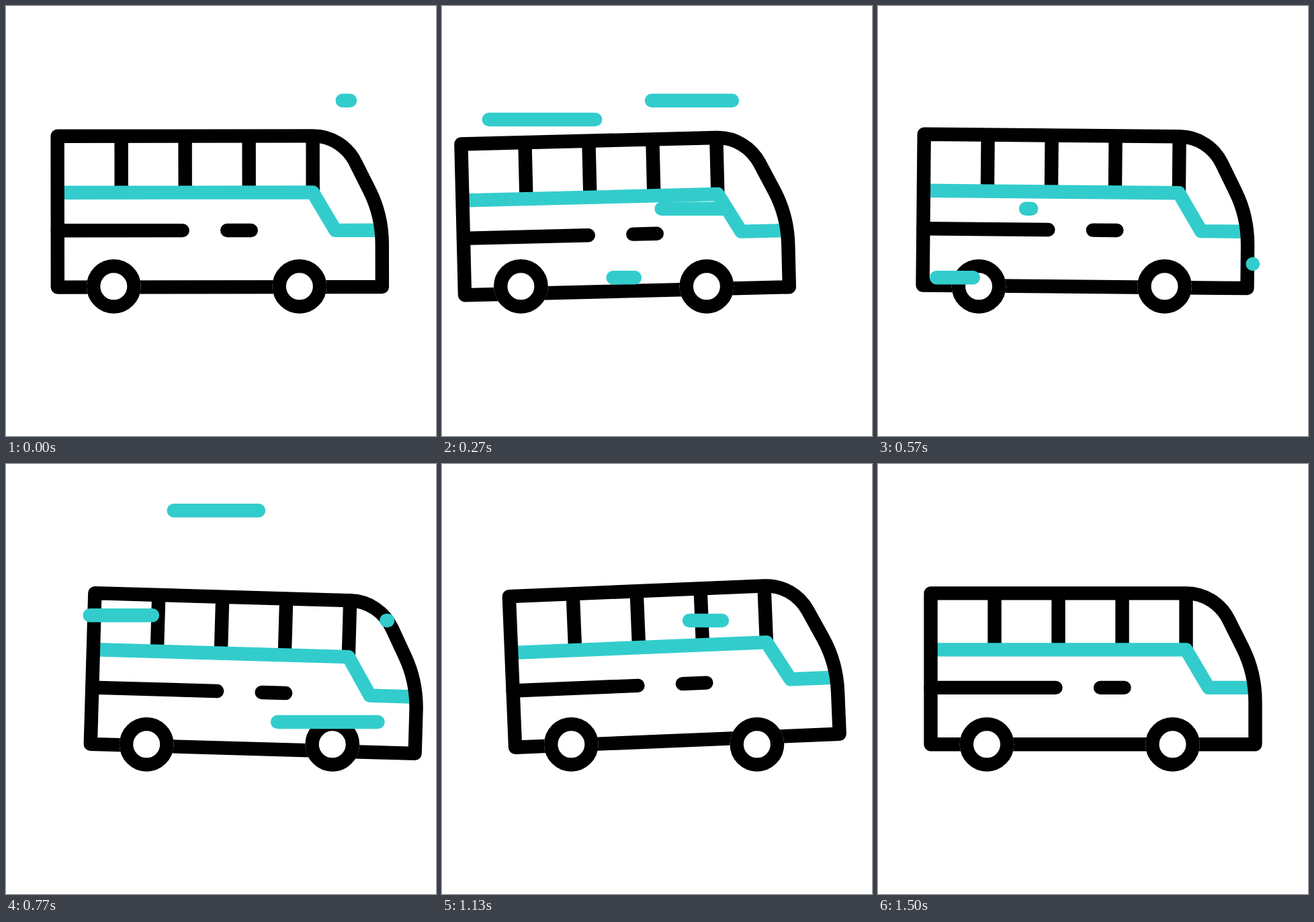
Write an HTML page that moves like this. It is 640 px wide and 640 px high and loops after 1670 ms.

```html
<!DOCTYPE html>
<html lang="en">
<head>
<meta charset="utf-8">
<title>Bus</title>
<style>
  html, body { margin: 0; height: 100%; overflow: hidden; background: #fff; }
  svg { display: block; width: 100%; height: 100%; fill: none; stroke: #000; stroke-width: 20.4; stroke-linejoin: round; }
  .teal { stroke: #3cc; }
  .round { stroke-linecap: round; }
</style>
</head>
<body>
<svg viewBox="0 0 640 640">
  <defs>
    <g id="wheel" fill="#fff">
      <circle r="40.4" stroke="none"/>
      <circle r="30.2"/>
    </g>
  </defs>
  <g id="body">
    <path d="M173.5 193v83m95-83v83m95-83v83m95-83v83"/>
    <path class="teal" d="M82 276.4H458.5L492 332.9H556"/>
    <path class="round" d="M78.5 332.9H264.5M331 332.9H366.5"/>
    <path d="M78.5 192.4H459C486 192.4 510 208 522 232L543 274C555 298 561.5 326 561.5 354V417.2H78.5Z"/>
  </g>
  <g id="wheels">
    <use href="#wheel" x="162" y="417.3"/>
    <use href="#wheel" x="438.5" y="417.3"/>
  </g>
  <path id="wind" class="teal round"/>
</svg>
<script>
const LOOP = 1670, LAST_STEP = 45, START = -1.3;
const GUST = { length: 200, sweep: 9, lag: 5.4 };

const [body, wheels, wind] = ['body', 'wheels', 'wind'].map(id => document.getElementById(id));

// Key poses as [step, value], starting from rest and eased in between
const shift = track([10.7, -51.2], [26.6, 62], [41.2, 0]);
const tilt = track([10, -1.55], [22, 1.8], [31.5, -2.6], [45, 0]);
const bounce = track([4.5, 9], [16, 0], [22, 8], [28.5, -12.8], [38.5, 0]);

// Right end, height and first step of each gust
const gusts = [
  [512, 140.8, START], [249, 169, .8], [420, 301.8, 3.7], [287, 404.3, 5.7],
  [558, 384, 16.8], [376, 69.2, 17.7], [218, 225.3, 18.7], [568, 233, 22.5]
];

function ease(s) {
  s = Math.min(1, Math.max(0, s));
  return s * s * (3 - 2 * s);
}

function track(...keys) {
  return step => {
    let value = 0, from = START, last = 0;
    for (const [to, next] of keys) {
      value += (next - last) * ease((step - from) / (to - from));
      [from, last] = [to, next];
    }
    return value;
  };
}

function gustPath([right, y, start], step) {
  const age = step - start;
  const head = ease(age / GUST.sweep);
  const tail = ease((age - GUST.lag) / GUST.sweep);
  if (head === tail) return '';
  return `M${right - GUST.length * head} ${y}H${right - GUST.length * tail}`;
}

function draw(step) {
  const x = shift(step);
  body.setAttribute('transform', `translate(${x} ${bounce(step)}) rotate(${tilt(step)} 320 417)`);
  wheels.setAttribute('transform', `translate(${x} 0)`);
  wind.setAttribute('d', gusts.map(gust => gustPath(gust, step)).join(''));
}

const begin = performance.now();
function tick() {
  const time = (performance.now() - begin) % LOOP;
  // 30 steps per second, rounded to 10 ms
  draw(Math.min(LAST_STEP, Math.floor(time * .03 + .11)));
  requestAnimationFrame(tick);
}
tick();
</script>
</body>
</html>
```
